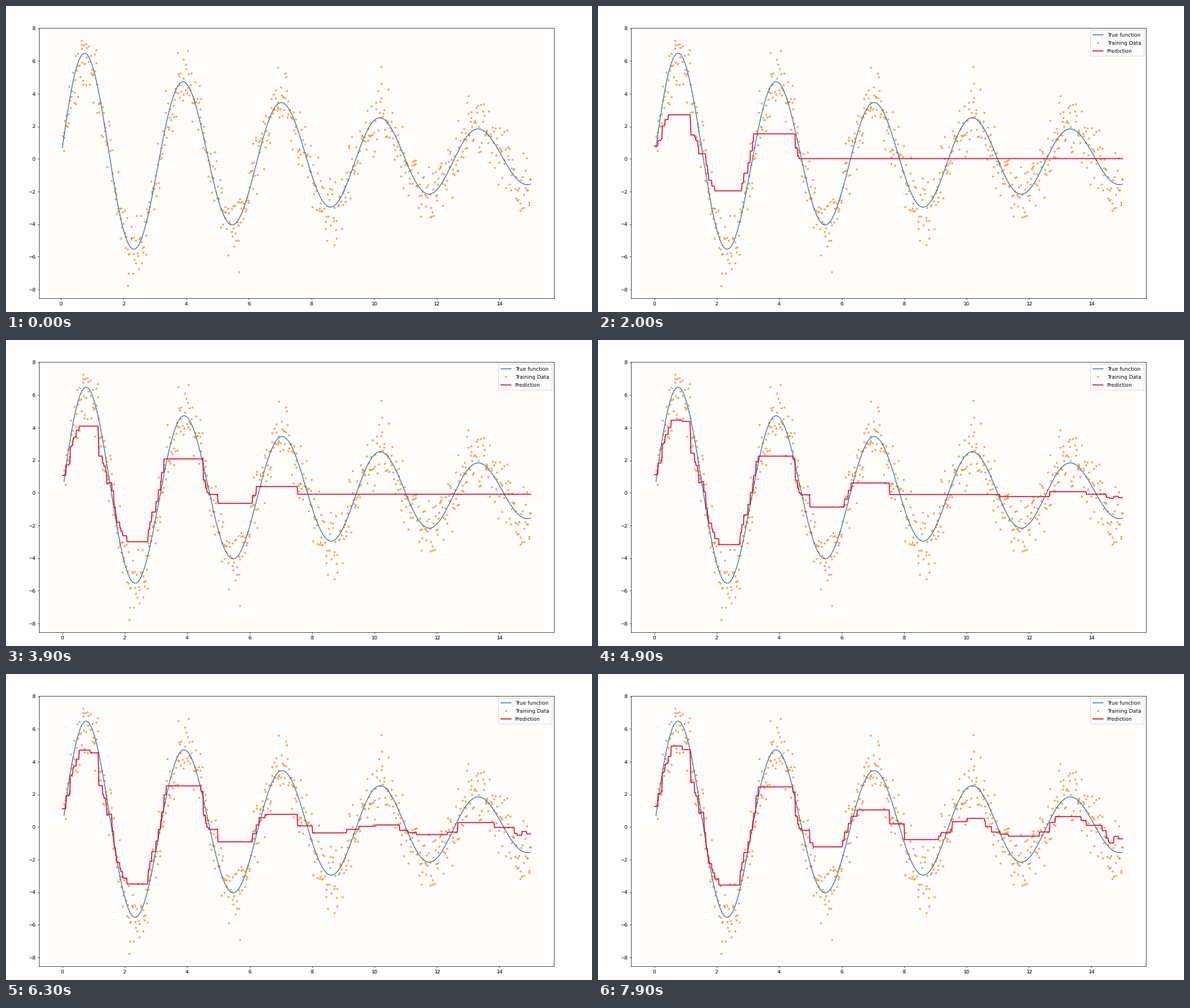
A matplotlib script that plays this animation: 800 px wide and 419 px high, repeating every 8 s.

```python
import numpy as np
import matplotlib.pyplot as plt
from matplotlib.animation import FuncAnimation

FRAME_MS, FRAMES = 100, 80
FIRST_TREE_MS, TREE_MS = 400, 318
RATE, DEPTH, MIN_LEAF = .1, 3, 4

# the most visible stray points; the rest of the cloud is random
STRAYS = np.array([(.66, 7.28), (2.14, -7.78), (3.72, 6.5), (5.69, -6.9),
                   (6.93, 5.6), (8.72, -5.25), (10.22, 5.65), (13.01, 3.85)])


def wave(x):
    return 7 * np.exp(-.1 * x) * np.sin(2 * x)


def make_data(count=690):
    rng = np.random.default_rng(7)
    x = np.linspace(.05, 15, count) + rng.uniform(-.02, .02, count)
    x = x.clip(.05, 15)
    noise = rng.normal(0, .95, count).clip(-2.1, 2.1)
    noise[np.abs(wave(x) + noise) > 7.1] *= -1
    x = np.append(x, STRAYS[:, 0])
    y = np.append(wave(x[:count]) + noise, STRAYS[:, 1])
    order = np.argsort(x)
    return x[order], y[order]


def tree(x, r, query, depth=DEPTH):
    """Fit a regression tree to r over sorted x and evaluate it at query."""
    size = len(x)
    if depth == 0 or size < 2 * MIN_LEAF:
        return np.full(query.shape, r.mean())
    n = np.arange(MIN_LEAF, size - MIN_LEAF + 1)
    left_sum = np.cumsum(r)[n - 1]
    gain = left_sum**2 / n + (r.sum() - left_sum)**2 / (size - n)
    i = n[np.argmax(gain)]
    left = query <= (x[i - 1] + x[i]) / 2
    out = np.empty(query.shape)
    out[left] = tree(x[:i], r[:i], query[left], depth - 1)
    out[~left] = tree(x[i:], r[i:], query[~left], depth - 1)
    return out


def boost(x, y, grid, rounds):
    query = np.concatenate([grid, x])
    fit = np.full(query.shape, y.mean())
    fits = [fit[:grid.size]]
    for _ in range(rounds):
        fit = fit + RATE * tree(x, y - fit[grid.size:], query)
        fits.append(fit[:grid.size])
    return fits


def trees_at(ms):
    return max(0, 1 + (ms - FIRST_TREE_MS) // TREE_MS)


x, y = make_data()
grid = np.linspace(0, 15, 1000)
curve_x = np.linspace(.05, 15, 600)
fits = boost(x, y, grid, trees_at(FRAMES * FRAME_MS))

plt.rcParams["text.hinting"] = "none"
fig = plt.figure(figsize=(16, 8.38), dpi=50, facecolor="#fefdfe")
ax = fig.add_axes([45 / 800, 19 / 419, 703 / 800, 370 / 419],
                  facecolor="#fffdfb")
ax.plot(curve_x, wave(curve_x), color="#2477a0", lw=1.5,
        label="True function")
ax.plot(x, y, "o", color="#ee8a35", alpha=.7, ms=3, zorder=1,
        label="Training Data")
fit_line, = ax.plot(grid, fits[0], color="#dc0a2e", lw=1.9,
                    label="Prediction")
legend = ax.legend(loc="upper right", labelspacing=.6, borderpad=.45)
ax.set_ylim(-8.533, 8.033)


def draw(i):
    n = trees_at(i * FRAME_MS)
    first = 0 if n else .05
    margin = .05 * (15 - first)
    ax.set_xlim(first - margin, 15 + margin)
    fit_line.set_ydata(fits[n])
    fit_line.set_visible(n > 0)
    legend.set_visible(n > 0)
    return fit_line, legend


anim = FuncAnimation(fig, draw, frames=FRAMES, interval=FRAME_MS,
                     repeat=True, repeat_delay=0, blit=False)
plt.show()
```
